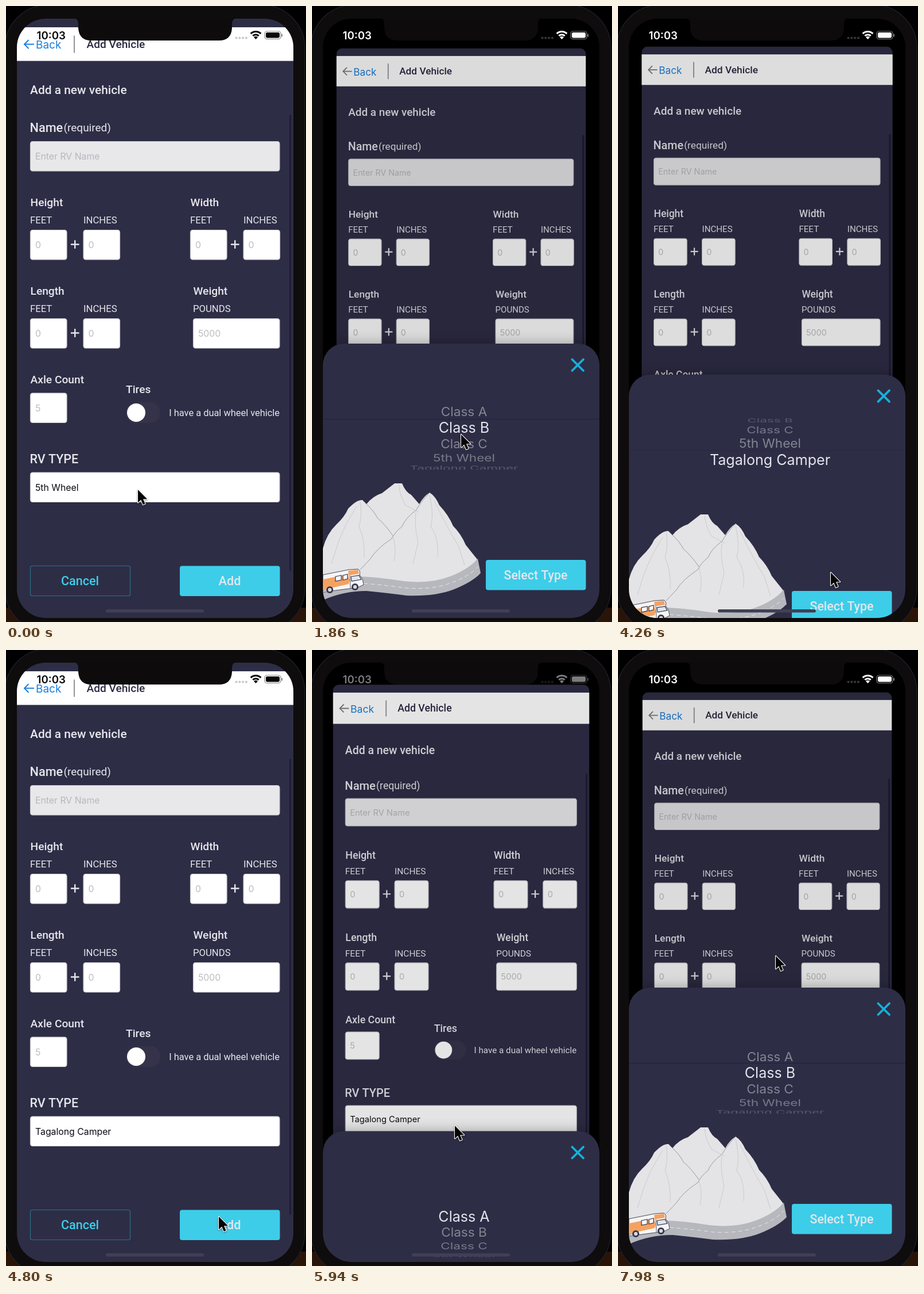
An HTML page with a canvas that plays this animation: 523 by 1071 pixels, repeating every 8000 ms.

```html
<!DOCTYPE html>
<html lang="en">
<head>
<meta charset="utf-8">
<title>Add Vehicle</title>
<style>
html, body { margin: 0; width: 100%; height: 100%; overflow: hidden; background: #000; }
canvas { display: block; width: 523px; height: 1071px; }
</style>
</head>
<body>
<canvas id="stage"></canvas>
<script>
const W = 523, H = 1071, LOOP = 8000, STEP = 60;
const canvas = document.getElementById('stage');
const ctx = canvas.getContext('2d');
const dpr = window.devicePixelRatio || 1;
canvas.width = W * dpr;
canvas.height = H * dpr;

const ROBOTO = 'Roboto, sans-serif';
const INTER = 'Inter, sans-serif';
const NAVY = '#2e2d46', PALE = '#e6e6ec', CYAN = '#3dcde9';
const TYPES = ['Class A', 'Class B', 'Class C', '5th Wheel', 'Tagalong Camper'];

// Keys are [time, value, value...]; each stretch is eased.
const SHEET = [[60, 0], [660, .68], [1020, .68], [1260, 1], [4200, 1], [4620, 0],
  [5460, 0], [6000, .77], [6180, .77], [6420, 1]];
const WHEEL = [[1380, 0], [1860, 1.05], [2100, 1], [2460, 1], [3240, 3.81],
  [3360, 3.81], [3600, 4], [4700, 4], [4700, 0], [6720, 0], [7140, 1]];
const POINTER = [[1020, 230, 841], [1380, 258, 774], [1860, 260, 745], [2460, 260, 745],
  [3240, 276, 680], [3360, 276, 680], [4080, 371, 985], [5040, 371, 985],
  [5400, 249, 827], [6180, 249, 827], [6660, 262, 745], [7140, 268, 715], [7740, 275, 532]];

function track(keys, t) {
  if (t <= keys[0][0]) return keys[0].slice(1);
  for (let i = 1; i < keys.length; i++) {
    const a = keys[i - 1], b = keys[i];
    if (t < b[0]) {
      const u = (t - a[0]) / (b[0] - a[0]);
      const e = u * u * (3 - 2 * u);
      return a.slice(1).map((v, k) => v + (b[k + 1] - v) * e);
    }
  }
  return keys[keys.length - 1].slice(1);
}

const clamp = v => Math.max(0, Math.min(1, v));

function layer(draw) {
  ctx.save();
  draw();
  ctx.restore();
}

function box(x, y, w, h, r, fill, stroke) {
  ctx.beginPath();
  ctx.roundRect(x, y, w, h, r);
  if (fill) { ctx.fillStyle = fill; ctx.fill(); }
  if (stroke) { ctx.strokeStyle = stroke; ctx.lineWidth = 1.2; ctx.stroke(); }
}

function line(points, color, width) {
  ctx.beginPath();
  points.forEach(([x, y]) => ctx.lineTo(x, y));
  ctx.strokeStyle = color;
  ctx.lineWidth = width;
  ctx.stroke();
}

function disc(x, y, r, color) {
  ctx.beginPath();
  ctx.arc(x, y, r, 0, 7);
  ctx.fillStyle = color;
  ctx.fill();
}

// y is the middle of the capitals
function text(str, x, y, size, color, font = ROBOTO, weight = 400, align = 'left') {
  ctx.font = `${weight} ${size}px ${font}`;
  ctx.textAlign = align;
  ctx.fillStyle = color;
  ctx.fillText(str, x, y + size * .36);
}

const label = (str, x, y, size = 19.2) => text(str, x, y, size, PALE, ROBOTO, 500);

function field(x, y, w, value, color = '#bdbdc3', fill = '#fff') {
  box(x, y, w, 51.5, 4, fill, '#c9c9d0');
  text(value, x + 8.5, y + 26, 15.8, color, INTER);
}

function feetInches(title, x, y) {
  label(title, x, y);
  text('FEET', x - .5, y + 30, 16.7, PALE);
  text('INCHES', x + 92.5, y + 30, 16.7, PALE);
  field(x, y + 48, 63.5, '0');
  field(x + 92.5, y + 48, 63.5, '0');
  line([[x + 70.5, y + 73], [x + 85, y + 73]], PALE, 2.4);
  line([[x + 77.7, y + 65.7], [x + 77.7, y + 80.3]], PALE, 2.4);
}

function header(p) {
  ctx.fillStyle = '#fff';
  ctx.fillRect(19, 37, 482, 58.5);
  const mix = (a, b) => Math.round(a + (b - a) * clamp(p * 1.5));
  const tint = `rgb(${mix(26, 125)},${mix(127, 125)},${mix(220, 130)})`;
  line([[32, 66.5], [49, 66.5]], tint, 2);
  line([[39.5, 59], [32, 66.5], [39.5, 74]], tint, 2);
  text('Back', 52, 67.5, 19, '#1a7fdc', INTER);
  ctx.fillStyle = '#92929c';
  ctx.fillRect(118, 51.5, 2, 30);
  text('Add Vehicle', 140.5, 66, 19.1, '#2a2942', ROBOTO, 500);
}

function form(p, type) {
  ctx.beginPath();
  ctx.roundRect(19, 22, 482, 1043, 12);
  ctx.clip();
  ctx.fillStyle = NAVY;
  ctx.fillRect(19, 22, 482, 1043);
  header(p);

  label('Add a new vehicle', 42, 145, 20.9);
  label('Name', 41.5, 211, 21.7);
  text('(required)', 100.5, 211, 19, PALE);
  field(42.5, 235.5, 434.5, 'Enter RV Name', '#b6b6be', '#e8e8eb');

  feetInches('Height', 42.5, 341.5);
  feetInches('Width', 321.5, 341.5);
  feetInches('Length', 42.5, 495.5);
  label('Weight', 326.5, 495.5);
  text('POUNDS', 326, 525.5, 16.7, PALE);
  field(326.5, 543.5, 150.5, '5000');

  label('Axle Count', 42.5, 649.5);
  field(42.5, 673, 63.5, '5');
  label('Tires', 209, 666);
  box(209, 689, 60, 36, 18, '#34334a');
  disc(227, 707, 16, '#fff');
  text('I have a dual wheel vehicle', 477, 707, 16.4, PALE, ROBOTO, 400, 'right');

  label('RV TYPE', 41.5, 787, 21.5);
  field(42.5, 811, 434.5, type, '#0a0a12');

  box(42.5, 973.5, 174, 52, 3, null, '#2b6e87');
  text('Cancel', 129, 999.5, 21.6, CYAN, ROBOTO, 500, 'center');
  box(303, 973.5, 174.5, 52.5, 4, CYAN);
  text('Add', 390, 999.5, 21.6, PALE, ROBOTO, 500, 'center');
  box(494, 189, 3.2, 793, 1.6, '#1e1d32');

  ctx.fillStyle = `rgba(0,0,0,${.14 * p})`;
  ctx.fillRect(19, 22, 482, 1043);
}

function wheelRows(pos, size, gain, color, alphaOf) {
  TYPES.forEach((name, i) => {
    const a = (i - pos) * .38;
    if (Math.abs(a) > 1.35) return;
    layer(() => {
      ctx.translate(265, 148 + Math.sin(a) * 75.5 * gain);
      ctx.scale(1, Math.cos(a));
      ctx.globalAlpha = alphaOf(a);
      text(name, 0, 0, size, color, INTER, 400, 'center');
    });
  });
}

function picker(pos) {
  layer(() => {
    ctx.beginPath();
    ctx.rect(19, 76, 482, 55);
    ctx.rect(19, 165, 482, 54);
    ctx.clip();
    wheelRows(pos, 22.6, 1, '#fff', a => Math.min(.42, .5 * Math.cos(a)));
  });
  layer(() => {
    ctx.beginPath();
    ctx.rect(19, 131, 482, 34);
    ctx.clip();
    wheelRows(pos, 25.1, 1.11, '#e4e4ea', () => 1);
  });
}

function shape(path, fill, stroke, width = 1) {
  const p = new Path2D(path);
  if (fill) { ctx.fillStyle = fill; ctx.fill(p); }
  if (stroke) { ctx.strokeStyle = stroke; ctx.lineWidth = width; ctx.stroke(p); }
}

function mountains() {
  shape('M19 943Q26 917 42 902Q57 888 63 874Q78 858 88 859L95 866Q106 852 122 847L144 830H157' +
    'Q163 845 173 850L187 866Q195 852 205 846Q215 852 222 868Q238 885 246 904' +
    'Q260 918 268 937L288 962L270 985L215 1006L150 1004L90 998L19 1020Z', '#e4e4e6');
  shape('M95 866Q108 878 114 890Q128 902 141 921M205 846Q188 864 182 876Q162 891 157 905' +
    'Q145 914 139 926Q112 944 102 961L84 980', null, '#8f9097', .9);
  shape('M151 832Q153 852 163 868L186 880M84 861Q88 884 82 905Q93 930 91 960M78 870Q55 905 44 938L34 970' +
    'M205 850Q213 884 207 905Q222 925 219 958M213 860Q236 908 255 938L266 972' +
    'M181 880Q178 905 185 932L176 970M141 923Q148 942 143 965', null, '#c3c4c9', .8);
  shape('M289 961Q272 980 240 992Q206 1005 160 1000Q110 992 80 992Q45 997 19 1015V1033' +
    'Q55 1017 95 1017Q135 1021 165 1025Q215 1027 248 1014Q280 1001 294 986Z', '#b6b8be');
  layer(() => {
    ctx.setLineDash([7, 5]);
    shape('M90 1004Q130 1007 165 1012Q210 1015 242 1003Q274 992 289 975', null, '#e6e6e9', 1);
  });
}

function camper() {
  shape('M19 989L64 980L80 979Q85 982 83 989L88 996L90 1006L80 1011L19 1019Z', '#f5f5f5', '#45465a', 1);
  shape('M19 997L62 988L66 998L64 1005L19 1015Z', '#f4a262');
  shape('M63 982L80 980L82 987L64 990Z', '#f4a262');
  shape('M41 992L51 990V998L41 1000ZM54 990L62 988V996L54 998Z', '#fff', '#33344c', 1.2);
  shape('M68 992L82 990L86 997L69 1000Z', '#dfe6ec', '#33344c', 1.2);
  shape('M66 990L67 1012M19 1016L36 1014', null, '#45465a', .9);
  [[31, 1015], [75, 1010]].forEach(([x, y]) => {
    disc(x, y, 6, '#33344c');
    disc(x, y, 3.2, '#d5d6da');
  });
}

function sheet(p, pos) {
  const top = 1560 - 973 * p;
  if (top > 1110) return;
  ctx.translate(0, top);
  layer(() => {
    ctx.shadowColor = 'rgba(0,0,0,.3)';
    ctx.shadowBlur = 22 * dpr;
    box(19, 0, 482, 540, [37, 37, 0, 0], NAVY);
  });
  layer(() => {
    ctx.lineCap = 'round';
    line([[453.5, 27.5], [473, 47]], '#18b1da', 3.8);
    line([[473, 27.5], [453.5, 47]], '#18b1da', 3.8);
  });
  ctx.fillStyle = `rgba(20,20,36,${.45 * clamp((p - .9) * 10)})`;
  ctx.fillRect(19, 131, 482, 1);
  picker(pos);
  layer(() => {
    ctx.translate(0, -587);
    mountains();
    camper();
  });
  box(303, 376, 174.5, 52.5, 4, CYAN);
  text('Select Type', 390, 402, 21.4, PALE, ROBOTO, 500, 'center');
}

function statusBar(p) {
  const light = p > .5;
  const color = light ? '#fff' : '#08080a';
  ctx.globalAlpha = light ? clamp((p - .55) / .4) : 1;
  text('10:03', 53.5, 51, 18.7, color, INTER, 600);
  for (let i = 0; i < 4; i++) disc(401.5 + i * 5.8, 55.5, 2.1, light ? '#38383c' : '#c9c9ce');
  [[14, 3], [8.8, 3]].forEach(([r, w]) => {
    ctx.beginPath();
    ctx.arc(435.5, 57, r - 1.5, -Math.PI * .75, -Math.PI * .25);
    ctx.strokeStyle = color;
    ctx.lineWidth = w;
    ctx.stroke();
  });
  shape('M435.5 58L432 54.2Q435.5 51.4 439 54.2Z', color);
  box(453, 46, 24, 9.5, 2.4, color);
  ctx.globalAlpha *= .5;
  box(451, 44, 28, 13.5, 4, null, color);
  box(480.2, 48.5, 1.8, 5, 1, color);
}

function notch() {
  shape('M118 21Q126 22 126 31V38Q127 60 149 60H371Q393 60 394 38V31Q394 22 402 21Z', '#0d0b0c');
}

function cursor(x, y) {
  ctx.translate(x, y);
  ctx.lineJoin = 'round';
  ctx.shadowColor = 'rgba(0,0,0,.35)';
  ctx.shadowBlur = 3 * dpr;
  ctx.shadowOffsetY = dpr;
  const arrow = 'M0 0V22.5L5.2 17.6L8.8 26L12.6 24.4L9.1 16.2H16.2Z';
  shape(arrow, '#fff', '#fff', 2.2);
  ctx.shadowColor = 'transparent';
  shape(arrow, '#050505');
}

function phone() {
  ctx.fillStyle = '#000';
  ctx.fillRect(0, 0, W, H);
  ctx.fillStyle = '#2a1307';
  ctx.fillRect(0, 1046, W, 25);
  box(-2, -2, 523, 1090, 75, '#0e0c0c', '#20202c');
}

function render(t) {
  const [p] = track(SHEET, t);
  const [pos] = track(WHEEL, t);
  const [x, y] = track(POINTER, t);
  const type = TYPES[t < 4200 ? 3 : 4];

  ctx.setTransform(dpr, 0, 0, dpr, 0, 0);
  phone();
  layer(() => {
    ctx.beginPath();
    ctx.roundRect(19, 22, 482, 1042, 50);
    ctx.clip();
    ctx.fillStyle = '#000';
    ctx.fillRect(19, 22, 482, 1042);
    layer(() => {
      const s = 1 - .0975 * p;
      ctx.translate(260, 549);
      ctx.scale(s, s);
      ctx.translate(-260, -549);
      form(p, type);
    });
    layer(() => sheet(p, pos));
    layer(() => statusBar(p));
    box(174, 1049, 171, 5.5, 2.7, '#403f55');
  });
  notch();
  layer(() => cursor(x, y));
}

function tick(now) {
  const t = now % LOOP;
  render(Math.floor(t / STEP) * STEP);
  requestAnimationFrame(tick);
}
requestAnimationFrame(tick);
</script>
</body>
</html>
```
